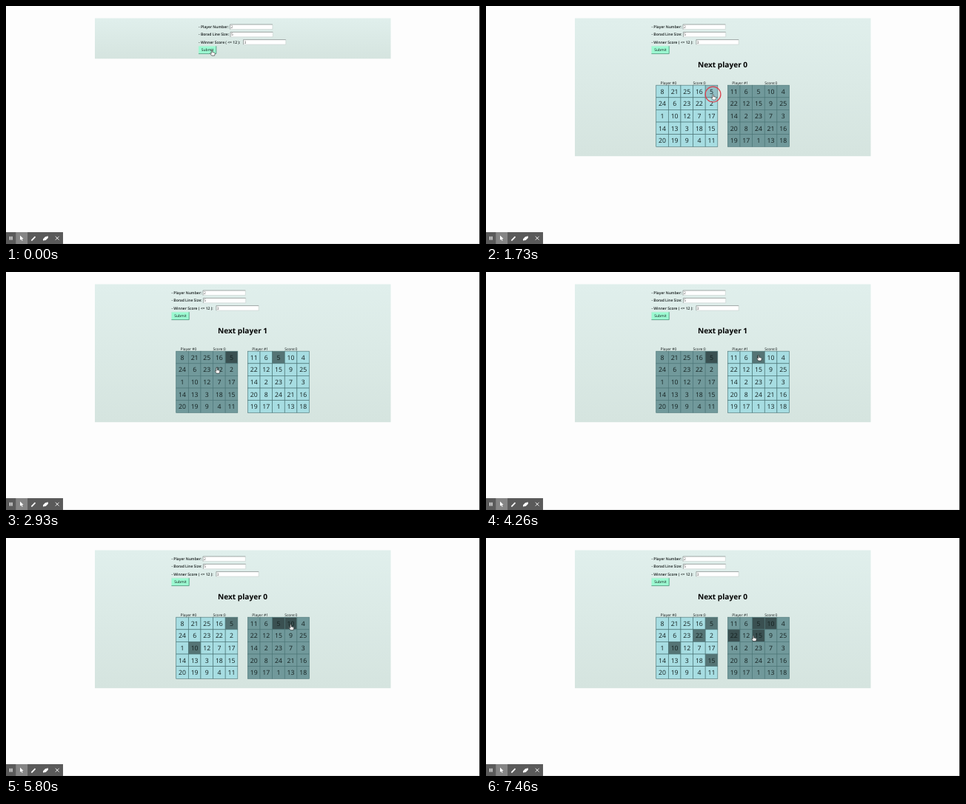
Animation, 640 px wide and 322 px high, one loop 7.53 s. Source, as an HTML page:

```html
<!DOCTYPE html>
<html lang="en">
<head>
<meta charset="utf-8">
<title>Bingo boards</title>
<style>
  html, body { margin: 0; width: 100%; height: 100%; overflow: hidden; background: #fdfdfd; }
  svg { display: block; width: 640px; height: 322px; }
  text { font-family: "Open Sans", "Noto Sans", sans-serif; text-rendering: geometricPrecision; fill: #101616; }
  .label { font-size: 5.03px; font-weight: 600; }
  .small { font-size: 5px; }
  .value { font-size: 4.9px; fill: #555; }
  .title { font-size: 10.1px; font-weight: 700; text-anchor: middle; fill: #000; }
  .digit { font-size: 8.7px; text-anchor: middle; fill: #14201f; }
</style>
</head>
<body>
<svg id="stage" viewBox="0 0 640 322">
  <defs>
    <linearGradient id="mint" x1="0" y1="0" x2="0" y2="1">
      <stop offset="0" stop-color="#e0efec"/>
      <stop offset="1" stop-color="#d5e4df"/>
    </linearGradient>
  </defs>
</svg>
<script>
const LOOP = 7530, FPS = 15;
const CELL = 16.62, TOP = 107.2;
const stage = document.getElementById('stage');

function add(parent, tag, attrs, text) {
  const el = document.createElementNS('http://www.w3.org/2000/svg', tag);
  for (const key in attrs) el.setAttribute(key, attrs[key]);
  if (text !== undefined) el.textContent = text;
  parent.append(el);
  return el;
}
const rect = (parent, x, y, width, height, fill, more) =>
  add(parent, 'rect', { x, y, width, height, fill, ...more });
const label = (parent, x, y, cls, text) => add(parent, 'text', { x, y, class: cls }, text);
const line = (parent, d, stroke, width = 0.7) =>
  add(parent, 'path', { d, stroke, fill: 'none', 'stroke-width': width });

// Panel and form
const panel = rect(stage, 120, 16.5, 399.5, 54.8, 'url(#mint)');
const form = add(stage, 'g', {});
[['- Player Number:', 302.6, '2'], ['- Borad Line Size:', 303, '5'], ['- Winner Score ( <= 12 ):', 320.5, '3']]
  .forEach(([name, x, value], i) => {
    const y = 25 + i * 10.3;
    label(form, 260, y + 4.9, 'label', name);
    rect(form, x, y, 57.3, 6.5, '#fff');
    line(form, `M${x} ${y + 6.5}h57.3v-6.5`, '#c6cecc', 0.6);
    line(form, `M${x} ${y + 6.5}v-6.5h57.3`, '#7c8583');
    label(form, x + 0.9, y + 5, 'value', value);
  });
rect(form, 260, 54.2, 24, 10.6, '#9cfad2');
line(form, 'M260 64.8v-10.6h24', '#c3eddc');
line(form, 'M260 64.6h23.8v-10.4', '#4f8f77', 0.8);
label(form, 263.8, 61.2, 'small', 'Submit');

// Boards
const game = add(stage, 'g', {});
const title = label(game, 319.6, 83.3, 'title', '');
const boards = [
  [229.7, [8,21,25,16,5, 24,6,23,22,2, 1,10,12,7,17, 14,13,3,18,15, 20,19,9,4,11]],
  [326.4, [11,6,5,10,4, 22,12,15,9,25, 14,2,23,7,3, 20,8,24,21,16, 19,17,1,13,18]]
].map(([left, numbers], player) => {
  label(game, left + 5.9, 105.5, 'small', 'Player #' + player);
  label(game, left + 49.8, 105.5, 'small', 'Score:0');
  return numbers.map((n, i) => {
    const x = left + (i % 5) * CELL, y = TOP + Math.floor(i / 5) * CELL;
    const box = rect(game, x, y, CELL, CELL, '#a7dde2', { stroke: '#4c7678', 'stroke-width': 0.65 });
    label(game, x + CELL / 2, y + 11.5, 'digit', n);
    return { n, box };
  });
});

// Recorder toolbar
rect(stage, 0, 306, 77, 16, '#5a5a5a');
rect(stage, 13.3, 306, 15.8, 16, '#858585');
line(stage, 'M5.4 311.7v4.8M7.9 311.7v4.8', '#fff', 1.3);
add(stage, 'path', { d: 'M19 310.6v6.2l1.5-1.3 1.1 2.3 1-.5-1-2.2h2z', fill: '#fff' });
line(stage, 'M34.9 316.8l4.6-4.7', '#fff', 1.8);
add(stage, 'path', { d: 'M33.9 317.8l.5-2 1.5 1.5z', fill: '#fff' });
add(stage, 'path', { d: 'M50 315.2l3-3 3.8-.9v2.4l-3 3-3.8.9z', fill: '#fff' });
line(stage, 'M66.8 311.7l4.8 4.8M71.6 311.7l-4.8 4.8', '#fff', 0.9);

// Window edge
rect(stage, 639, 0, 1, 322, '#3a3a3a');
rect(stage, 77, 321.4, 562, 0.6, '#d8d8d8');

// Pointer
const ring = add(stage, 'circle', { r: 10.4, fill: 'none', stroke: '#d8434f', 'stroke-width': 1.3 });
const hand = add(stage, 'path', {
  d: 'M-.7 .4Q0-.6.7.4V3L3.4 3.6Q4.3 3.9 4.2 4.9L3.6 7.6H-.3L-2.4 4.8Q-2.5 3.9-1.7 4.1L-.7 4.9Z',
  fill: '#fff', stroke: '#222', 'stroke-width': 0.6, 'stroke-linejoin': 'round'
});

// Pointer stops: time, x, y
const path = [
  [0, 278, 59.5], [860, 278, 59.5], [1200, 279, 61], [1530, 306.5, 119.5], [2460, 306.5, 119.5],
  [2930, 284.5, 129.5], [3260, 286, 131], [4060, 368, 112.5], [4400, 368, 112.5],
  [4930, 365, 117], [5200, 365, 117], [5470, 384.5, 117], [5800, 384.5, 117],
  [6460, 292.5, 130.5], [6760, 292.5, 130.5], [7060, 361, 132], [LOOP, 361, 132]
];
const clicks = [530, 1660, 5060, 5460, 6590, 7060];
const CLICK_TIME = 240;
const START = 590;
// Moves: time, number taken
const moves = [[1800, 5], [5590, 10], [6790, 22], [7190, 15]];

function pointerAt(t) {
  const i = Math.max(1, path.findIndex(p => p[0] > t));
  const [t0, x0, y0] = path[i - 1], [t1, x1, y1] = path[i];
  const k = (t - t0) / (t1 - t0), e = k * k * (3 - 2 * k);
  return [x0 + (x1 - x0) * e, y0 + (y1 - y0) * e];
}

function draw(t) {
  const playing = t >= START;
  panel.setAttribute('height', playing ? 186.7 : 54.8);
  form.setAttribute('transform', `translate(${playing ? -36.6 : 0} 0)`);
  game.setAttribute('visibility', playing ? 'visible' : 'hidden');

  const taken = moves.filter(m => t >= m[0]).map(m => m[1]);
  const next = taken.length % 2;
  title.textContent = 'Next player ' + next;
  boards.forEach((cells, player) => cells.forEach(({ n, box }) => {
    const used = taken.includes(n), active = player === next;
    const pressed = active && n === 5 && !used && t >= 1520;
    box.setAttribute('fill', used ? (active ? '#557475' : '#3a5051')
      : pressed ? '#92bfc5' : active ? '#a7dde2' : '#71999b');
  }));

  const at = `translate(${pointerAt(t)})`;
  hand.setAttribute('transform', at);
  ring.setAttribute('transform', at);
  const down = clicks.some(c => t >= c && t < c + CLICK_TIME);
  ring.setAttribute('visibility', down ? 'visible' : 'hidden');
}

const origin = performance.now();
function tick() {
  const t = (performance.now() - origin) % LOOP;
  draw(Math.floor((t + 4) * FPS / 1000) * 1000 / FPS % LOOP);
  requestAnimationFrame(tick);
}
draw(0);
requestAnimationFrame(tick);
</script>
</body>
</html>
```
